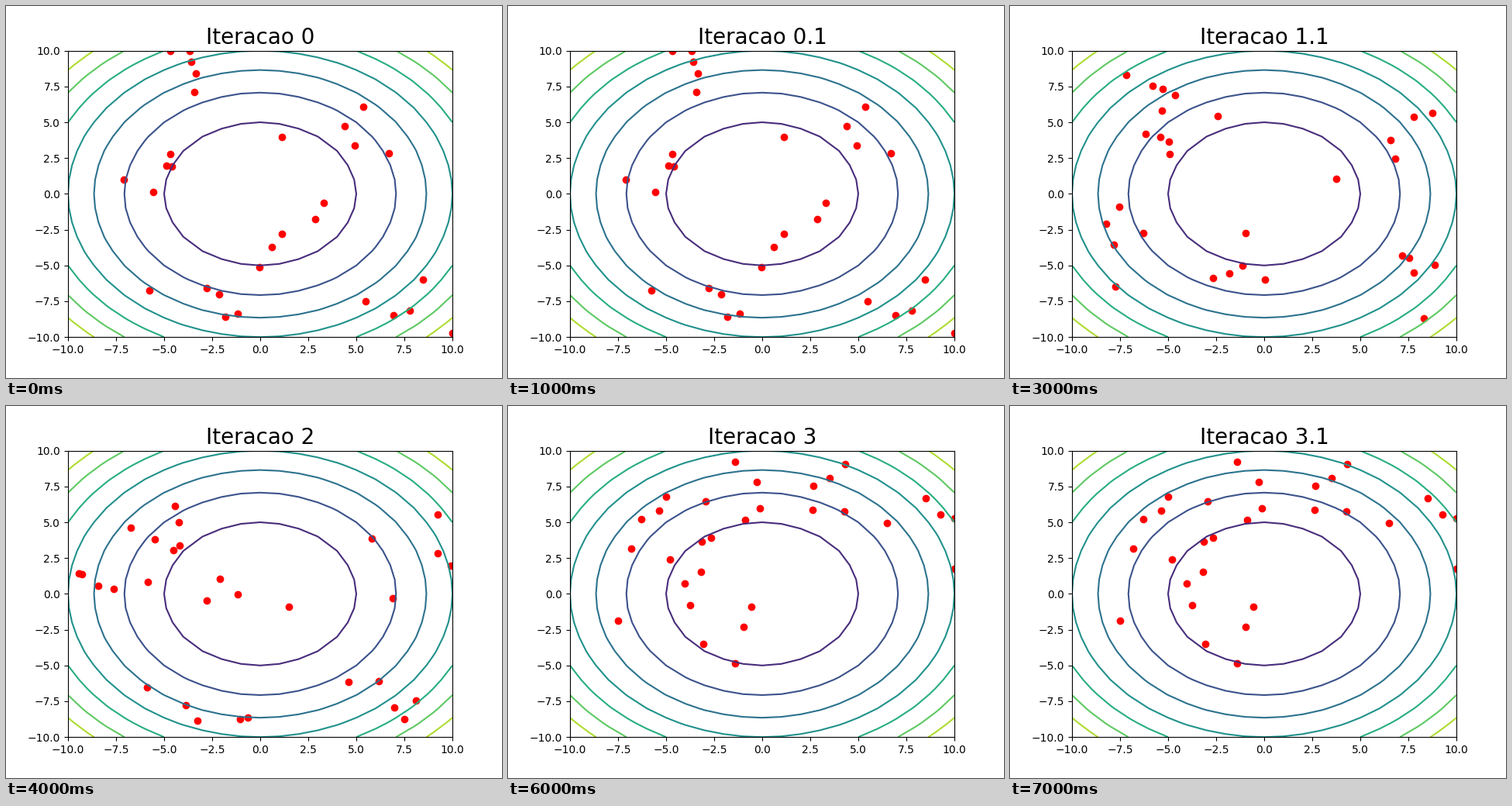
Animation of 640 by 480 pixels, one loop 8000 ms. Source, as a matplotlib script:

```python
import numpy as np
import matplotlib.pyplot as plt
from matplotlib.animation import FuncAnimation

LIMIT = 10
PARTICLES = 30
SPREAD = 1.7

# Centres the particles gather around in each iteration
CENTRES = [
    [(-3.6, 8.7), (5.4, 4.9), (-4.8, 1.8), (3.2, -2.9), (8.6, -7.1), (-3.6, -7.2)],
    [(-5.0, 7.7), (6.6, 4.5), (-4.4, 4.3), (-7.8, -4.7), (-0.4, -4.5), (7.2, -5.3)],
    [(-4.4, 6.0), (7.1, 3.1), (-7.5, 0.8), (-0.9, 1.6), (-2.9, -7.8), (7.6, -7.4)],
    [(-4.6, 6.7), (-1.2, 6.5), (2.9, 7.5), (9.3, 4.1), (-4.7, 1.7), (-1.4, -2.4)],
]


def scatter_around(centres, rng):
    """Spread the particles evenly over the centres, inside the search area."""
    home = np.resize(centres, (PARTICLES, 2))
    return np.clip(home + rng.normal(0, SPREAD, home.shape), -LIMIT, LIMIT)


rng = np.random.default_rng(7)
swarms = [scatter_around(centres, rng) for centres in CENTRES]

fig, ax = plt.subplots(figsize=(6.4, 4.8), dpi=100)
grid = np.arange(-LIMIT, LIMIT + 1)
X, Y = np.meshgrid(grid, grid)
ax.contour(X, Y, X**2 + Y**2, levels=np.arange(0, 201, 25))
dots = ax.scatter(*swarms[0].T, c="red")
ax.set_xlim(-LIMIT, LIMIT)
ax.set_ylim(-LIMIT, LIMIT)
title = ax.set_title("Iteracao 0", fontsize=20)


def update(frame):
    step, half = divmod(frame, 2)
    dots.set_offsets(swarms[step])
    title.set_text(f"Iteracao {step}.1" if half else f"Iteracao {step}")
    return dots, title


anim = FuncAnimation(fig, update, frames=2 * len(swarms), interval=1000,
                     repeat=True, repeat_delay=0, blit=False)
plt.show()
```
